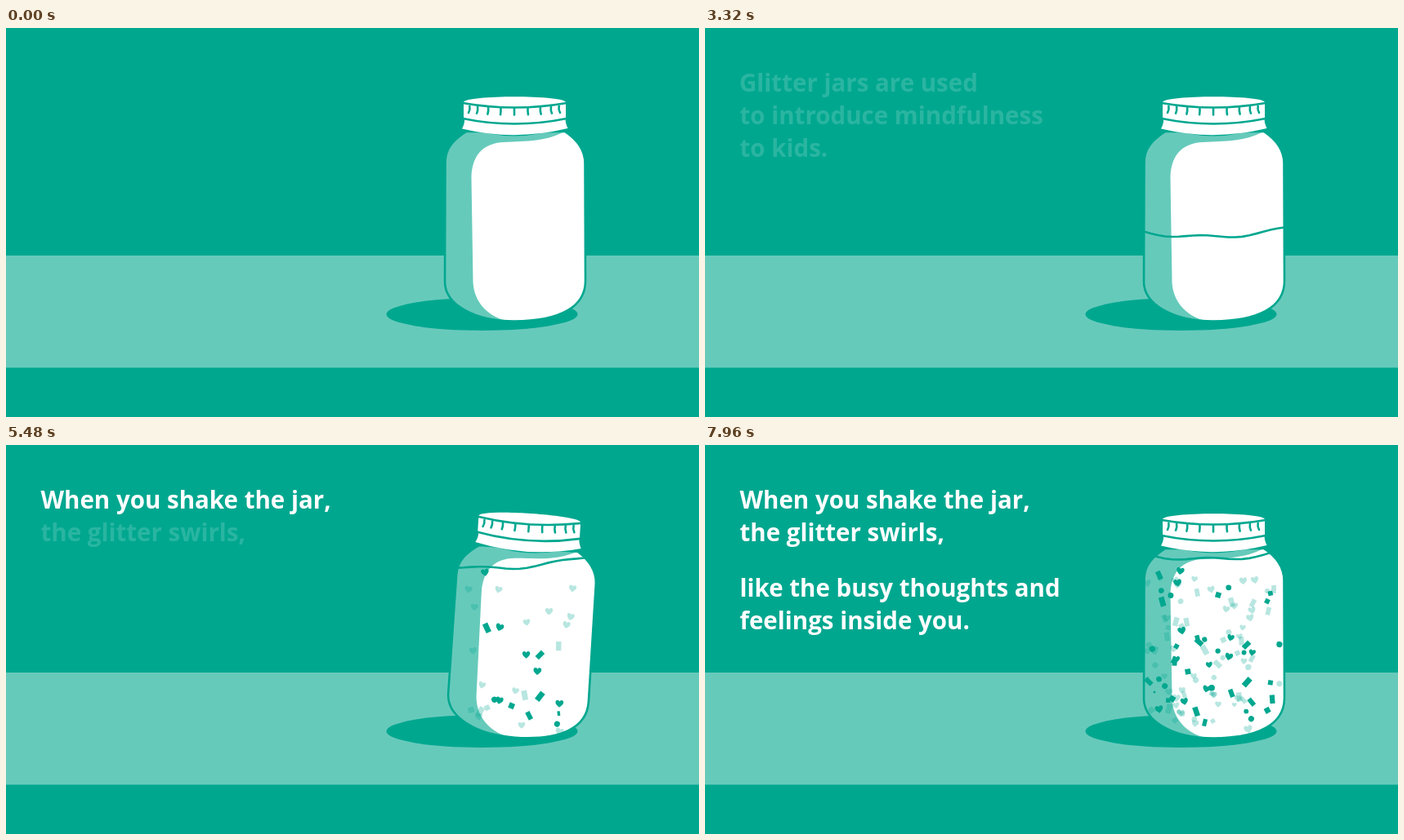
Recreate the animation shown at these times as an HTML page. Size 848 px wide and 477 px high, loop 8 s.

```html
<!DOCTYPE html>
<html lang="en">
<head>
<meta charset="utf-8">
<title>Glitter jar</title>
<style>
  html, body { margin: 0; width: 100%; height: 100%; overflow: hidden; background: #00a78f; }
  svg { display: block; width: 100vw; height: 100vh; }
  text { font: 700 29.5px "Open Sans", "Noto Sans", sans-serif; fill: #fff; }
  .line { fill: none; stroke: #00a78f; stroke-width: 2.6; stroke-linecap: round; }
</style>
</head>
<body>
<svg viewBox="0 0 848 477">
  <defs>
    <path id="body" d="M563 127C548 137 537.500 147 537.500 165L537 311C537 340 575 359.500 622 359.500C678 359.500 709 342 709 310L708.500 166C708.500 149 699 137 684 127Z"/>
    <clipPath id="inside"><use href="#body"/></clipPath>
    <path id="heart" d="M0 5C-3 2.500 -5 1 -5 -1.500C-5 -5 -1 -5 0 -2.500C1 -5 5 -5 5 -1.500C5 1 3 2.500 0 5Z"/>
    <rect id="strip" x="-3.500" y="-6" width="7" height="12"/>
    <rect id="square" x="-3.500" y="-3.500" width="7" height="7"/>
    <circle id="dot" r="4"/>
  </defs>
  <rect width="848" height="477" fill="#00a78f"/>
  <rect y="279" width="848" height="137.500" fill="#66cabb"/>
  <ellipse cx="582.500" cy="351" rx="117" ry="20" fill="#00a78f"/>

  <g id="jar">
    <use href="#body" fill="#66cabb"/>
    <g clip-path="url(#inside)">
      <path fill="#fff" d="M685 126C662 139 640 138.500 610 140C582 141 569.500 158 569.500 185L571.500 311C572 335 590 357 620 360H720V126Z"/>
      <g id="glitter" fill="#00a78f"></g>
      <path id="water" class="line"/>
    </g>
    <use href="#body" class="line"/>
    <path fill="#00a78f" d="M560 120Q622 145 685 120Z"/>
    <path fill="#fff" d="M560 91C562 82 683 82 685 91L685 109C684 113 685 118 687.500 123Q622 139 558 123.500C561 118 562 113 560 109Z"/>
    <path class="line" d="M559 92Q622 103 686 92M559 111Q622 124 686 111"/>
    <path id="ticks" class="line"/>
  </g>

  <g id="intro">
    <text x="42" y="78">Glitter jars are used</text>
    <text x="42.500" y="118">to introduce mindfulness</text>
    <text x="42.500" y="158">to kids.</text>
  </g>
  <text id="shake" x="42.500" y="78">When you shake the jar,</text>
  <text id="swirl" x="42.500" y="118">the glitter swirls,</text>
  <g id="thoughts">
    <text x="42.500" y="186">like the busy thoughts and</text>
    <text x="42.500" y="226">feelings inside you.</text>
  </g>
</svg>
<script>
const LOOP = 8000;
const PIECES = 120;
const byId = id => document.getElementById(id);
const clamp = v => Math.min(1, Math.max(0, v));
const ramp = (t, from, to) => clamp((t - from) / (to - from));
const easeInOut = k => (1 - Math.cos(Math.PI * k)) / 2;
const easeOut = k => 1 - (1 - k) ** 2;

// The jar swings between these extremes: [time, degrees].
const swings = [[3560, 0], [4040, 12], [4560, -6.5], [5180, 7.5], [5780, 0]];

function jarAngle(t) {
  let angle = 0;
  for (let i = 1; i < swings.length; i++) {
    const [from, a] = swings[i - 1], [to, b] = swings[i];
    angle += (b - a) * easeInOut(ramp(t, from, to));
  }
  return angle;
}

// The water fills the jar, expands while shaken and sloshes from side to side.
function waterPath(t) {
  const level = 375 - 116 * easeOut(ramp(t, 200, 1640)) - 3 * ramp(t, 1640, 3320)
    - 116 * ramp(t, 3550, 5650);
  const shaking = ramp(t, 3560, 4160) - ramp(t, 5480, 5880);
  const slosh = -2 + 12 * shaking * Math.cos((t - 4160) / 880 * 2 * Math.PI);
  let d = "";
  for (let u = -1; u <= 1.01; u += 0.1) {
    const y = level + slosh * u - 8 * u * u + 2 * Math.cos(u * 6 + t / 800);
    d += `${d ? "L" : "M"}${623 + 86 * u} ${y}`;
  }
  return d;
}

// Ticks are spaced evenly around the round lid.
let ticks = "";
for (let i = -4; i <= 4; i++) {
  const side = Math.sin(i * 0.27);
  ticks += `M${622 + 62 * side} ${98.5 - 3.5 * side * side}q${-side} 4 ${side * 1.5} 8`;
}
byId("ticks").setAttribute("d", ticks);

let seed = 41;
const random = () => {
  seed = (seed * 16807) % 2147483647;
  return seed / 2147483647;
};

// Random x that stays within the rounded jar at height y.
function xInside(y) {
  const inset = Math.max(0, y - 312) ** 2 / 40 + Math.max(0, 170 - y) * 0.7;
  return 543 + inset + random() * (160 - 2 * inset);
}

function makePiece(_, i) {
  const homeY = 347 - 193 * random();
  const startY = 305 + 38 * random();
  const shapes = ["heart", "strip", "dot", "square"];
  const shape = i < 16 ? "heart" : shapes[Math.floor(random() * shapes.length)];
  const dark = i > 3 && random() < 0.38;
  const node = document.createElementNS("http://www.w3.org/2000/svg", "use");
  node.setAttribute("href", "#" + shape);
  node.setAttribute("opacity", dark ? 1 : 0.28);
  byId("glitter").append(node);
  return {
    node, homeY, startY,
    homeX: xInside(homeY),
    startX: xInside(startY),
    birth: 3900 + 4050 * (i / PIECES) ** 0.75,
    phase: random() * 2 * Math.PI,
    angle: shape === "heart" ? 0 : random() * 80 - 40,
    size: 0.88 - 0.18 * i / PIECES + 0.15 * random()
  };
}
const glitter = Array.from({ length: PIECES }, makePiece);

function drawPiece(p, t) {
  const age = t - p.birth;
  p.node.setAttribute("visibility", age < 0 ? "hidden" : "visible");
  if (age < 0) return;
  const k = easeOut(clamp(age / 1200));
  const swing = t / 650 + p.phase;
  const x = p.startX + (p.homeX - p.startX) * k + 6 * k * Math.sin(swing);
  const y = p.startY + (p.homeY - p.startY) * k + 5 * k * Math.cos(swing);
  const turn = p.angle + 14 * k * Math.sin(swing);
  const size = p.size * clamp(age / 80);
  p.node.setAttribute("transform", `translate(${x} ${y}) rotate(${turn}) scale(${size})`);
}

const fade = (id, opacity) => byId(id).setAttribute("opacity", opacity);

function draw() {
  const t = performance.now() % LOOP;
  fade("intro", ramp(t, 400, 900) - ramp(t, 2920, 3400));
  fade("shake", ramp(t, 3560, 4060));
  fade("swirl", ramp(t, 5400, 5900));
  fade("thoughts", ramp(t, 7100, 7600));

  byId("jar").setAttribute("transform", `rotate(${jarAngle(t)} 635 372)`);
  byId("water").setAttribute("d", waterPath(t));
  glitter.forEach(p => drawPiece(p, t));
  requestAnimationFrame(draw);
}
draw();
</script>
</body>
</html>
```
